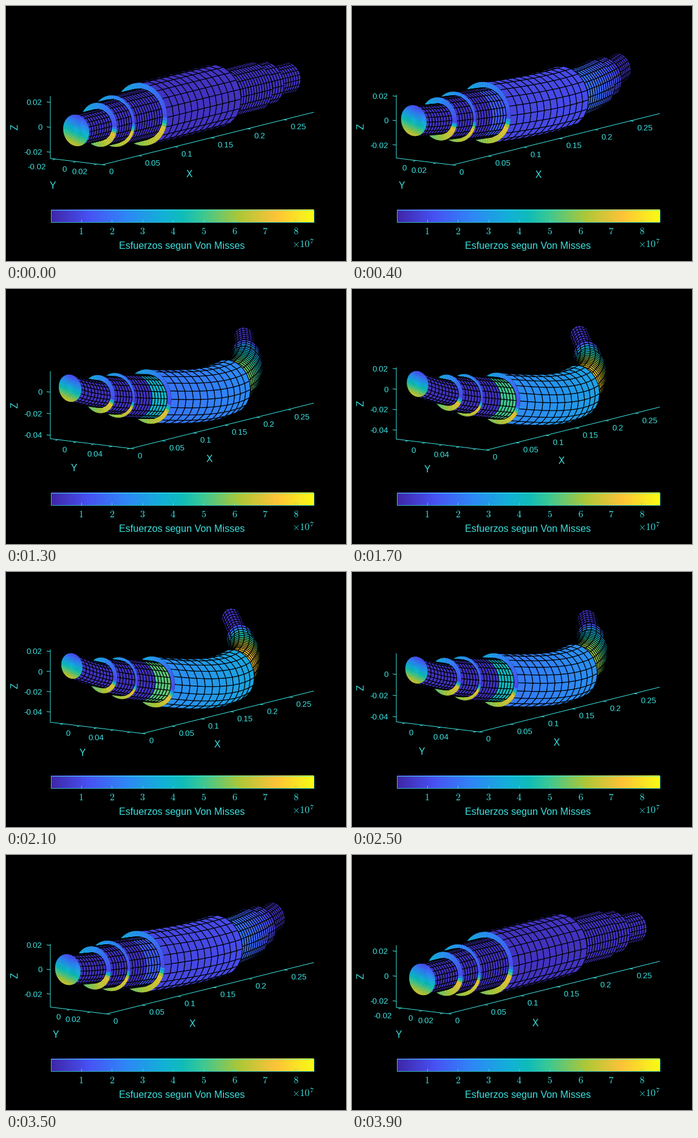
These frames come from a looping animation (560 by 420 pixels, 4 s). A matplotlib script:

```python
import numpy as np
import matplotlib.pyplot as plt
from matplotlib.animation import FuncAnimation
from matplotlib.collections import LineCollection, PolyCollection
from matplotlib.colors import LinearSegmentedColormap
from matplotlib.patches import Rectangle

plt.rcParams["font.family"] = "Liberation Sans"
plt.rcParams["mathtext.fontset"] = "cm"

W, H, DPI = 560, 420, 100
PT = 72 / DPI                      # points per pixel
STATES = 20
INK = "#3ce2e0"
AZ, EL = np.radians(55), np.radians(10)

STEPS = "#3e26a8 #4852f4 #2e87f7 #12b1d6 #37c897 #abc739 #fec338 #f9fb15".split()
PARULA = LinearSegmentedColormap.from_list("parula", sorted(
    [*zip(np.linspace(0, 1, 8), STEPS), (0.5, "#0fbcb9")]))

# Shoulders of the shaft and the radius between them, in metres
CUTS = [0, 0.031, 0.0515, 0.072, 0.0895, 0.1915, 0.242, 0.261, 0.2915]
RADII = [0.0125, 0.0175, 0.0205, 0.0205, 0.025, 0.02, 0.0175, 0.0125]
LENGTH, R_MAX = CUTS[-1], max(RADII)

# Elastic line through a few stations (cm) with their sideways sag (mm)
SAG = np.polyfit([0, 5, 14, 19, 24, 29.15], [-9, 11, 40.8, 46.3, 26, -21.5], 5)


def deflection(x):
    y = np.polyval(SAG, x * 100) / 1000
    return y, -y * np.maximum(0.86 - 2.1 * x, 0.42)


def moment(x):
    """Bending load: a slow rise, then a parabolic fall past the thick part."""
    if x < CUTS[3]:
        return 0
    if x < CUTS[5]:
        return 0.18 + 0.78 * x
    return 0.33 * max(0, 1 - ((x - CUTS[5]) / 0.07) ** 2)


def build_mesh():
    """Quads ordered from the far end of the shaft to the near one."""
    xs, rs, ts, gain, rho = [], [], [], [], []

    def add_band(x0, x1, r0, r1, sides, g=0, w=-1):
        angles = np.linspace(0, 2 * np.pi, sides + 1)
        for t0, t1 in zip(angles[:-1], angles[1:]):
            xs.append((x0, x1, x1, x0))
            rs.append((r0, r1, r1, r0))
            ts.append((t0, t0, t1, t1))
            gain.append(g)
            rho.append(w)

    for i in reversed(range(len(RADII))):
        start, end, r = CUTS[i], CUTS[i + 1], RADII[i]
        pitch = 0.0085 if r == R_MAX else 0.0035
        edges = np.linspace(start, end, round((end - start) / pitch) + 1)
        for x0, x1 in zip(edges[-2::-1], edges[:0:-1]):
            load = moment((x0 + x1) / 2) * (R_MAX / r) ** 4
            add_band(x0, x1, r, r, 20, load)
        if i and RADII[i - 1] < r:
            add_band(start, start, RADII[i - 1], r, 60, w=1)
    for j in range(8):
        add_band(0, 0, r * j / 8, r * (j + 1) / 8, 60, w=(j + 0.5) / 8)
    return [np.array(a) for a in (xs, rs, ts, gain, rho)]


X, R, T, GAIN, RHO = build_mesh()
DY, DZ = deflection(X)
IS_FACE = RHO >= 0
IS_CAP = IS_FACE & (RHO < 1)
MID = np.degrees(T.mean(axis=1))


def project(x, y, z):
    u = np.cos(AZ) * x + np.sin(AZ) * y
    v = np.sin(EL) * (np.sin(AZ) * x - np.cos(AZ) * y) + np.cos(EL) * z
    return u, v


def stress(p):
    # Shoulder faces climb once around the rim and drop back at a seam
    turn = (MID + 12 * p) % 360
    rim = np.interp(turn, [0, 338, 360], [0.12, 0.82, 0.12])
    cap = 0.45 - 0.33 * RHO * np.cos(np.radians(MID - 75))
    face = np.where(IS_CAP, cap, rim)
    return np.clip(np.where(IS_FACE, face, 0.045 + GAIN * p), 0, 1)


def ticks(lo, hi, step):
    return np.arange(np.ceil(lo / step), np.floor(hi / step) + 1) * step


def label(v):
    return f"{round(v, 2) + 0:g}"


fig = plt.figure(figsize=(W / DPI, H / DPI), dpi=DPI, facecolor="black")
ax = fig.add_axes([0, 0, 1, 1])
live = []


def text(x, y, s, px, ha="center", **kw):
    kw.setdefault("va", "center_baseline")
    return ax.text(x, y, s, fontsize=px * PT, color=INK, ha=ha, **kw)


def draw_colorbar():
    ramp = PARULA(np.linspace(0, 1, 256))[None, :, :3]
    ax.imshow(ramp, extent=(73.5, 506.5, 356, 335.5), aspect="auto")
    ax.add_patch(Rectangle((73.5, 335.5), 433, 20.5, fill=False,
                           edgecolor=INK, linewidth=0.8 * PT))
    for n in range(1, 9):
        x = 73.3 + 50.5 * n
        ax.plot([x, x], [355.5, 351.5], color=INK, linewidth=0.8 * PT)
        text(x, 370.5, f"${n}$", 16)
    text(489.3, 390, r"$\times10^7$", 16)
    text(290, 394, "Esfuerzos segun Von Misses", 16.1)


def draw_axes(place, s, k, ylim, zlim):
    (y0, y1), (z0, z1) = ylim, zlim
    left, near = place(0, y0, z0), place(0, y1, z0)
    far, top = place(LENGTH, y1, z0), place(0, y0, z1)
    lines = [[top, left, near, far]]

    def add_tick(point, dx, dy, *args):
        x, y = point
        lines.append([(x, y), (x + dx, y + dy)])
        if args:
            ox, oy, v, ha = args
            live.append(text(x + ox, y + oy, label(v), 13.4, ha))

    def add_name(a, b, dx, dy, name):
        live.append(text((a[0] + b[0]) / 2 + dx, (a[1] + b[1]) / 2 + dy,
                         name, 15.6))

    for v in ticks(0, LENGTH, 0.05):
        add_tick(place(v, y1, z0), 5.5, 0.7, 10.8, 11.5, v, "left")
    for v in ticks(y0, y1, 0.02):
        named = k < 11 or round(v / 0.02) % 2 == 0
        note = (-15.8, 12.5, v, "right") if named else ()
        add_tick(place(0, v, z0), -5, 1.3, *note)
    for v in ticks(z0, z1, 0.01 if 5 <= k <= 10 else 0.02):
        add_tick(place(0, y0, v), -6, -0.8, -13.5, 0, v, "right")

    # Names drift outwards as the view zooms in
    zoom = s - 1703
    add_name(near, far, -18.7 - 0.0324 * zoom, 52.5 + 0.0145 * zoom, "X")
    add_name(left, near, -23.5 - 0.0408 * zoom, 40 - 0.004 * zoom, "Y")
    live.append(text(15.5, (left[1] + top[1]) / 2, "Z", 15.6,
                     va="center", rotation=90))
    live.append(ax.add_collection(
        LineCollection(lines, colors=INK, linewidths=PT, zorder=1)))


def update(frame):
    while live:
        live.pop().remove()
    k = min(frame, 2 * STATES - 1 - frame)
    p = k / 17

    y = R * np.cos(T) + p * DY
    z = R * np.sin(T) + p * DZ
    ylim, zlim = (y.min(), y.max()), (z.min(), z.max())

    # Fit the bounding box to the plot width and centre it
    bu, bv = project(*np.meshgrid((0, LENGTH), ylim, zlim))
    s = 434 / np.ptp(bu)
    cu, cv = (bu.min() + bu.max()) / 2, (bv.min() + bv.max()) / 2

    def place(px, py, pz):
        u, v = project(px, py, pz)
        return 290 + s * (u - cu), 161.7 - s * (v - cv)

    draw_axes(place, s, k, ylim, zlim)

    quads = np.stack(place(X, y, z), axis=-1)
    d1, d2 = quads[:, 2] - quads[:, 0], quads[:, 3] - quads[:, 1]
    front = d1[:, 0] * d2[:, 1] - d1[:, 1] * d2[:, 0] < 0
    faces = PARULA(stress(p))
    edges = np.where(IS_FACE[:, None], faces, (0, 0, 0, 1))
    widths = np.where(IS_FACE, 0.4, 1.1) * PT
    live.append(ax.add_collection(PolyCollection(
        quads[front], facecolors=faces[front], edgecolors=edges[front],
        linewidths=widths[front], zorder=2)))
    return live


draw_colorbar()
ax.set_xlim(0, W)
ax.set_ylim(H, 0)
ax.set_autoscale_on(False)
ax.axis("off")

anim = FuncAnimation(fig, update, frames=2 * STATES, interval=100,
                     init_func=lambda: [], repeat=True, repeat_delay=0)
plt.show()
```
